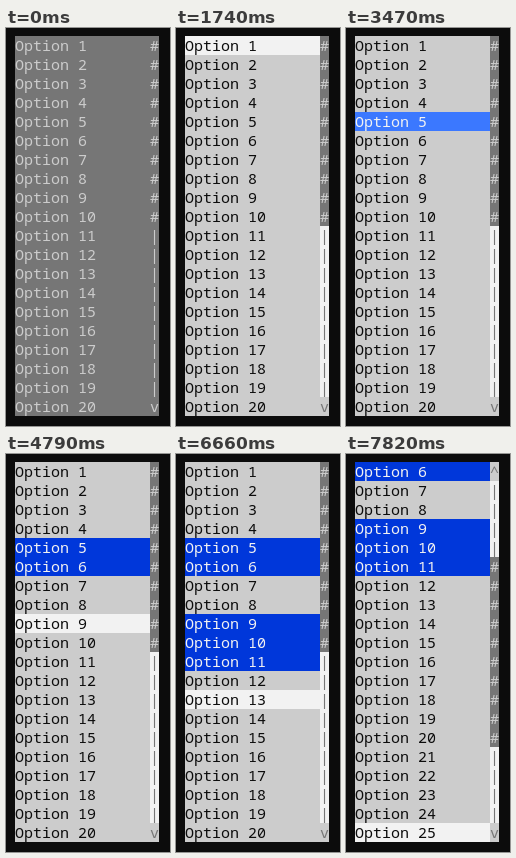
These frames come from a looping animation (164 px wide and 398 px high, 8 s). An HTML page with a canvas:

```html
<!DOCTYPE html>
<html lang="en">
<head>
<meta charset="utf-8">
<title>List box</title>
<style>
  html, body { margin: 0; width: 100%; height: 100%; overflow: hidden; background: #0c0c0c; }
  canvas { display: block; }
</style>
</head>
<body>
<canvas id="stage" width="164" height="398"></canvas>
<script>
const ctx = document.getElementById('stage').getContext('2d');

const LOOP = 8000;
const LEFT = 9, TOP = 8, CELL = 9, ROW = 19, BASELINE = 15;
const ROWS = 20, LIST_WIDTH = 15 * CELL, THUMB = 10;

const BLACK = '#0c0c0c', GRAY = '#767676', SILVER = '#cccccc', WHITE = '#f2f2f2';
const BLUE = '#0037da', BRIGHT_BLUE = '#3b78ff';

const HOVER_AT = 1000, FOCUS_AT = 1740;
// Single key presses, each moving the cursor one option down.
const MOVES = [2210, 2470, 2800, 3070, 3670, 4260, 4530, 4790, 5260, 5730, 6260];
const LATE_MOVES = [7420, 7620, 7820];
// The held key repeats faster than the screen refreshes.
const HOLD = { start: 6660, step: 70, steps: 8, rate: 1.25 };
const SELECTED_AT = { 5: 3470, 6: 3990, 9: 5060, 10: 5530, 11: 6060 };

const countPast = (times, t) => times.filter(at => t >= at).length;

function cursorAt(t) {
  const ticks = Math.floor((t - HOLD.start) / HOLD.step) + 1;
  const held = Math.max(0, Math.min(HOLD.steps, ticks));
  return 1 + countPast(MOVES, t) + Math.floor(held * HOLD.rate) + countPast(LATE_MOVES, t);
}

function drawCell(x, row, width, text, back, fore) {
  const y = TOP + row * ROW;
  ctx.fillStyle = back;
  ctx.fillRect(x, y, width, ROW);
  ctx.fillStyle = fore;
  ctx.fillText(text, x, y + BASELINE);
}

function optionColors(option, cursor, t) {
  if (t < HOVER_AT) return [GRAY, SILVER];
  if (t < FOCUS_AT) return [SILVER, BLACK];
  const current = option === cursor;
  if (t >= SELECTED_AT[option]) return [current ? BRIGHT_BLUE : BLUE, WHITE];
  return [current ? WHITE : SILVER, BLACK];
}

function scrollCell(row, offset) {
  if (row >= offset && row < offset + THUMB) return ['#', GRAY, SILVER];
  if (row === 0) return ['^', SILVER, GRAY];
  if (row === ROWS - 1) return ['v', SILVER, GRAY];
  return ['|', WHITE, GRAY];
}

function draw(t) {
  const cursor = cursorAt(t);
  const offset = Math.max(0, cursor - ROWS);

  ctx.fillStyle = BLACK;
  ctx.fillRect(0, 0, 164, 398);
  ctx.font = '15px "Noto Sans Mono", "DejaVu Sans Mono", monospace';

  for (let row = 0; row < ROWS; row++) {
    const option = row + offset + 1;
    drawCell(LEFT, row, LIST_WIDTH, 'Option ' + option, ...optionColors(option, cursor, t));

    let [mark, back, fore] = scrollCell(row, offset);
    if (t < FOCUS_AT) [back, fore] = optionColors(option, cursor, t);
    drawCell(LEFT + LIST_WIDTH, row, CELL, mark, back, fore);
  }
}

const start = performance.now();
function tick() {
  draw((performance.now() - start) % LOOP);
  requestAnimationFrame(tick);
}
tick();
</script>
</body>
</html>
```
